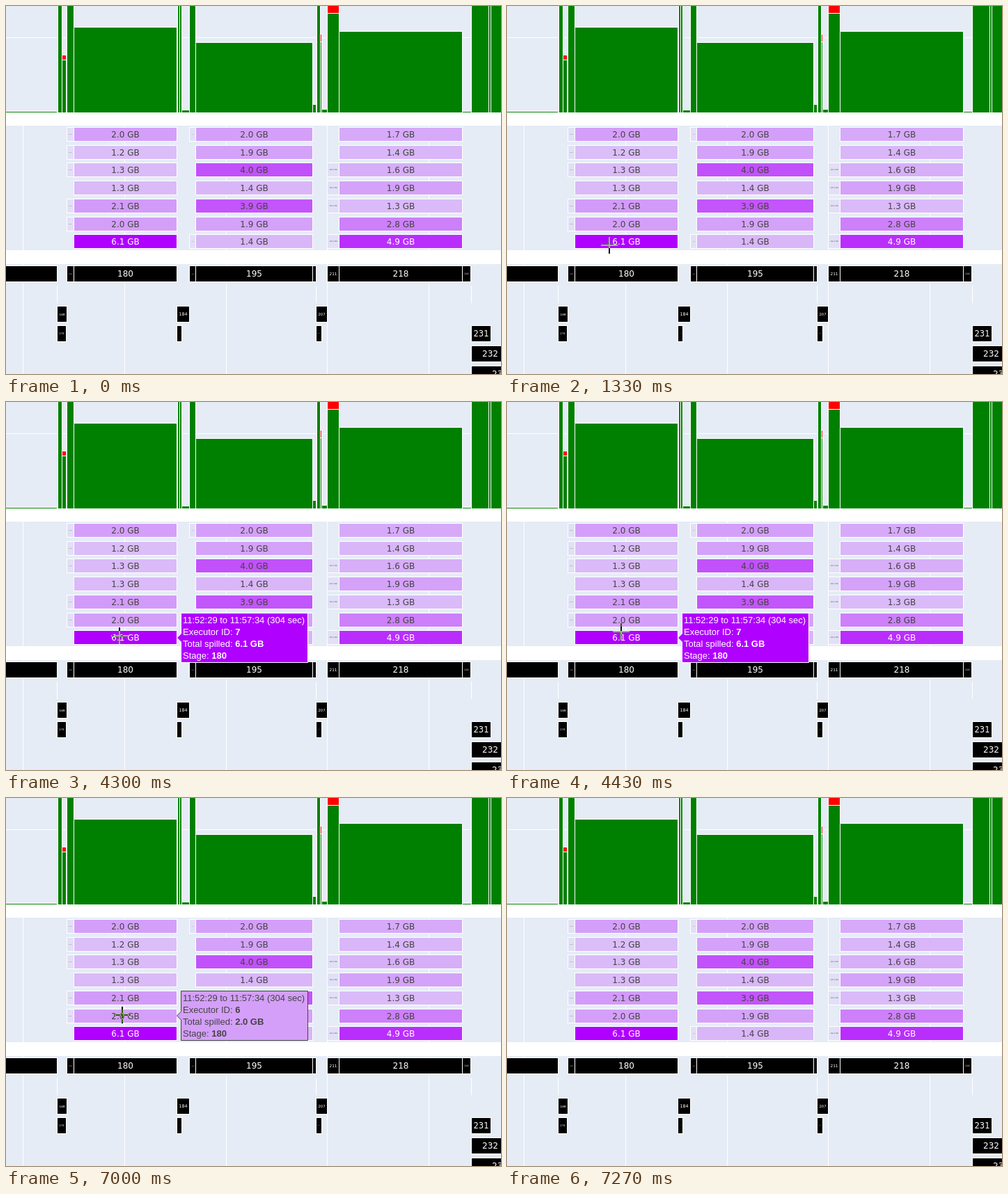
An HTML page with a canvas for the animation above (8230 ms loop, 711 by 529 pixels).

```html
<!DOCTYPE html>
<html lang="en">
<head>
<meta charset="utf-8">
<title>Executor spill timeline</title>
<style>
html, body { margin: 0; width: 100%; height: 100%; overflow: hidden; background: #fff; }
canvas { display: block; }
</style>
</head>
<body>
<canvas id="stage" width="711" height="529"></canvas>
<script>
const ctx = document.getElementById('stage').getContext('2d');
const LOOP = 8230, HOVER_DELAY = 70;
const PANEL = '#e5ecf6', DARK = '#444', GREEN = '#008000', RED = '#f00';
const CHART_FONT = '"DejaVu Sans", Verdana, sans-serif';
const TIP_FONT = '13px "Liberation Sans", Arial, sans-serif';

// [left, right, top, optional top of the red part]
const activity = [
  [-2, 73, 152], [75, 80, 0], [81, 86, 78, 71], [88, 97, 0], [98, 245, 31],
  [247, 249, 0], [250, 252, 0], [253, 263, 150], [264, 272, 0], [273, 440, 53],
  [441, 445, 142], [447, 451, 0], [452, 453, 52, 41], [454, 461, 149],
  [462, 478, 11, 0], [479, 655, 37], [656, 668, 152], [669, 693, 0],
  [694, 696, 0], [697, 713, 0]
];
// Spilled GB per executor; `small` lists rows with a short earlier stage
const spills = [
  { left: 98, right: 245, from: 88, small: [0, 1, 2, 4, 5], gb: [2.0, 1.2, 1.3, 1.3, 2.1, 2.0, 6.1] },
  { left: 273, right: 440, from: 264, small: [0, 6], gb: [2.0, 1.9, 4.0, 1.4, 3.9, 1.9, 1.4] },
  { left: 479, right: 655, from: 462, small: [2, 3, 4, 6], gb: [1.7, 1.4, 1.6, 1.9, 1.3, 2.8, 4.9] }
];
// [row, left, right, label]
const stages = [
  [0, -2, 73, ''], [0, 88, 97, '179'], [0, 98, 245, '180'], [0, 264, 272, '194'],
  [0, 273, 440, '195'], [0, 441, 445, '206'], [0, 462, 478, '211'], [0, 479, 655, '218'],
  [0, 656, 667, '226'], [2, 74, 87, '169'], [2, 246, 263, '184'], [2, 446, 461, '207'],
  [3, 74, 86, '178'], [3, 246, 252, '186'], [3, 446, 453, '209'],
  [3, 669, 696, '231'], [4, 669, 722, '232'], [5, 669, 750, '233']
];

function rect(x, y, w, h, color) {
  ctx.fillStyle = color;
  ctx.fillRect(x, y, w, h);
}

function bar(left, right, top, height, color) {
  rect(left - 1, top - 1, right - left + 2, height + 2, '#fff');
  rect(left, top, right - left, height, color);
}

// Centred text, shrunk to the bar's width
function label(text, left, right, middle, color) {
  ctx.font = '12px ' + CHART_FONT;
  const size = Math.min(12, 12 * (right - left - 5) / ctx.measureText(text).width);
  if (size <= 0) return;
  ctx.font = size + 'px ' + CHART_FONT;
  ctx.textAlign = 'center';
  ctx.fillStyle = color;
  ctx.fillText(text, (left + right) / 2, middle + size * 0.37);
}

function spillColor(gb) {
  const k = gb / 6.1, mix = (a, b) => Math.round(a + (b - a) * k);
  return `rgb(${mix(229, 176)},${mix(236, 0)},${mix(246, 255)})`;
}

function drawCharts() {
  rect(0, 0, 711, 529, '#fff');
  rect(0, 0, 711, 153, PANEL);
  rect(0, 172, 711, 179, PANEL);
  rect(0, 371, 711, 158, PANEL);
  rect(0, 45, 711, 1, '#fff');
  for (let i = 0; i < 5; i++) rect(Math.round(24 + 145.8 * i), 172, 1, 357, '#fff');

  for (const [left, right, top, redTop] of activity) {
    bar(left, right, top, 153 - top, GREEN);
    if (redTop !== undefined) bar(left, right, redTop, top - 1 - redTop, RED);
  }
  for (const { left, right, from, small, gb } of spills) {
    gb.forEach((value, row) => {
      const top = Math.round(175 + 25.7 * row);
      if (small.includes(row)) {
        bar(from, left - 1, top, 19, spillColor(0.3));
        label('300.0 MB', from, left - 1, top + 9.5, DARK);
      }
      bar(left, right, top, 19, spillColor(value));
      label(value.toFixed(1) + ' GB', left, right, top + 9.5, value > 4.5 ? '#fff' : DARK);
    });
  }
  for (const x of [73, 445, 668]) rect(x, 402, 1, 25, '#fff');
  for (const [row, left, right, text] of stages) {
    const top = Math.round(374.2 + 28.75 * row);
    bar(left, right, top, 22, '#000');
    label(text, left, right, top + 11, '#fff');
  }
}

const smooth = u => u * u * (3 - 2 * u);
const moves = [
  { start: 970, end: 1570, steps: 17, from: [5, 437], to: [162, 339],
    ease: [u => 1 - (1 - u) ** 2.65, u => 1 - (1 - u) ** 3.36] },
  { start: 4300, end: 4630, steps: 10, from: [163, 336], to: [167, 310], ease: [smooth, smooth] },
  { start: 7000, end: 7270, steps: 8, from: [167, 312], to: [41, 555],
    ease: [u => u ** 1.8, u => u ** 1.8] }
];

function pointerAt(time) {
  const move = moves.filter(m => time >= m.start).pop();
  if (!move) return [-50, 600];
  const { start, end, steps, from, to, ease } = move;
  const u = Math.min(1, Math.floor((time - start) / (end - start) * steps) / steps);
  return from.map((a, i) => Math.round(a + (to[i] - a) * ease[i](u)));
}

function drawTooltip([x, y]) {
  if (x < 98 || x > 245 || y < 300 || y > 349) return;
  const row = y < 326 ? 5 : 6, middle = row === 5 ? 313 : 339;
  const value = spills[0].gb[row], ink = row === 5 ? DARK : '#fff';
  const top = middle - 35.5, bottom = middle + 35.5;
  ctx.beginPath();
  for (const [px, py] of [[245.5, middle], [251.5, middle - 6], [251.5, top], [433.5, top],
    [433.5, bottom], [251.5, bottom], [251.5, middle + 6]]) ctx.lineTo(px, py);
  ctx.closePath();
  ctx.fillStyle = spillColor(value);
  ctx.strokeStyle = ink;
  ctx.lineWidth = 1;
  ctx.fill();
  ctx.stroke();

  ctx.fillStyle = ink;
  ctx.textAlign = 'left';
  const lines = [['11:52:29 to 11:57:34 (304 sec)', ''], ['Executor ID: ', row + 1],
    ['Total spilled: ', value.toFixed(1) + ' GB'], ['Stage: ', '180']];
  lines.forEach(([name, strong], i) => {
    const baseline = middle - 21 + 17 * i;
    ctx.font = TIP_FONT;
    ctx.fillText(name, 254, baseline);
    const width = ctx.measureText(name).width;
    ctx.font = 'bold ' + TIP_FONT;
    ctx.fillText(strong, 254 + width, baseline);
  });
}

// Crosshair that inverts what lies below it
function drawPointer([x, y]) {
  ctx.globalCompositeOperation = 'difference';
  ctx.fillStyle = '#fff';
  ctx.beginPath();
  ctx.rect(x - 1, y - 12, 2, 24);
  ctx.rect(x - 12, y - 1, 24, 2);
  ctx.fill();
  ctx.globalCompositeOperation = 'source-over';
}

function frame() {
  const time = performance.now() % LOOP;
  drawCharts();
  drawTooltip(pointerAt(time - HOVER_DELAY));
  drawPointer(pointerAt(time));
  requestAnimationFrame(frame);
}
frame();
</script>
</body>
</html>
```
